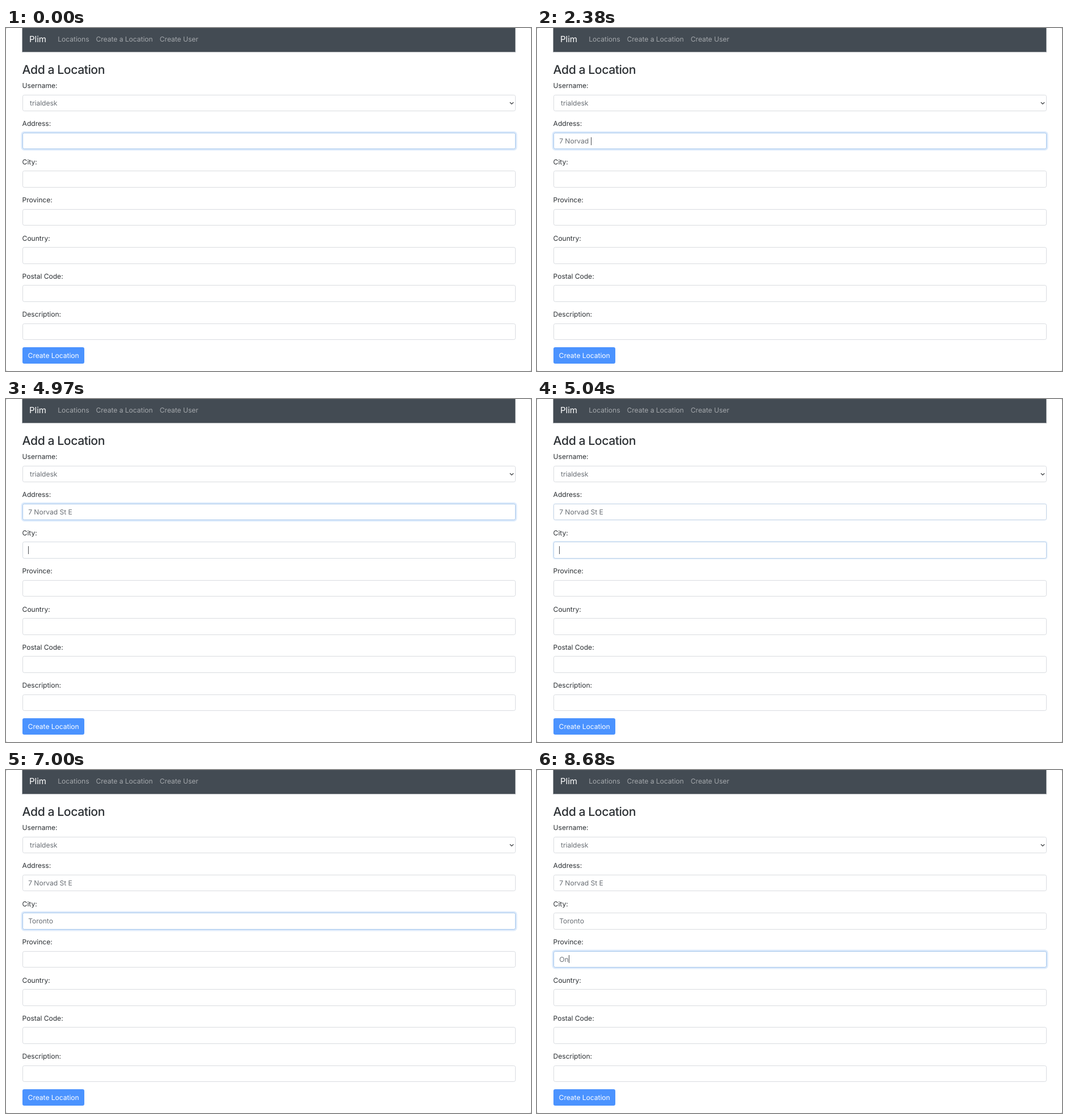
Write an HTML page that moves like this. It is 925 px wide and 606 px high and loops after 8820 ms.

```html
<!DOCTYPE html>
<html lang="en">
<head>
<meta charset="utf-8">
<title>Add a Location</title>
<style>
  html, body { margin: 0; width: 100%; height: 100%; overflow: hidden; background: #dcdcdc; }
  #page {
    position: relative; width: 925px; height: 606px; overflow: hidden;
    background: #fff; border-radius: 4px; color: #2c3034;
    font: 12.1px/20px Inter, "Open Sans", sans-serif;
    letter-spacing: -0.04px; text-rendering: geometricPrecision;
  }
  #page > * { position: absolute; white-space: pre; }
  .bar {
    left: 28px; top: -1px; width: 868px; height: 42px; background: #434b53 padding-box;
    border: 1px solid rgba(67, 75, 83, 0.45);
  }
  .nav { top: 10px; color: #a3a7ab; }
  .brand { top: 10px; left: 41px; font-size: 15.1px; color: #fff; }
  .title { left: 28.6px; top: 59px; font-size: 21.2px; line-height: 30px; font-weight: 500; letter-spacing: -0.45px; }
  .label { left: 28.6px; }
  .field {
    left: 29px; width: 868.6px; height: 29.5px; box-sizing: border-box;
    border: 1px solid #d9dce0; border-radius: 3.2px; padding-left: 9.2px;
    line-height: 28px; color: #6a6f75; background: #fff;
  }
  .caret { display: inline-block; width: 1px; height: 14px; margin-right: -1px; vertical-align: -2.6px; background: #4a4d50; }
  .button {
    left: 29px; top: 564px; width: 109px; height: 29px; line-height: 29.5px;
    border-radius: 3.2px; background: #4b93ff; color: #fff; text-indent: 9.6px;
  }
</style>
</head>
<body>
<div id="page"></div>
<script>
const LOOP = 8820, STEP = 70, FADE = 150;
const TOP = 117.6, PITCH = 67.35;
const PLAIN = [217, 220, 224], FOCUS = [163, 197, 235];
const page = document.getElementById('page');

function add(cls, text, style = {}) {
  const el = document.createElement('div');
  el.className = cls;
  el.textContent = text;
  Object.assign(el.style, style);
  page.append(el);
  return el;
}

add('bar', '');
add('brand', 'Plim');
add('nav', 'Locations', { left: '91.3px' });
add('nav', 'Create a Location', { left: '158.5px' });
add('nav', 'Create User', { left: '270.8px' });
add('title', 'Add a Location');

const names = ['Username', 'Address', 'City', 'Province', 'Country', 'Postal Code', 'Description'];
const fields = names.map((name, i) => {
  const y = TOP + PITCH * i;
  add('label', name + ':', { top: y - 25.5 + 'px' });
  const box = add('field', '', { top: y + 'px' });
  const text = document.createElement('span');
  const caret = document.createElement('span');
  caret.className = 'caret';
  box.append(text, caret);
  return { box, text, caret };
});
fields[0].text.textContent = 'trialdesk';
fields[0].box.style.paddingLeft = '12px';
add('button', 'Create Location');

const arrow = document.createElementNS('http://www.w3.org/2000/svg', 'svg');
arrow.setAttribute('width', 10);
arrow.setAttribute('height', 8);
arrow.style.cssText = 'left:885.5px;top:128.5px';
arrow.innerHTML = '<path d="M1.8 2.2L5 5.2L8.2 2.2" fill="none" stroke="#4a4d50" stroke-width="1.4"/>';
page.append(arrow);

// Each entry: field, time it gets focus, full text, time of every key press
const typing = [
  { field: 1, from: -FADE, text: '7 Norvad St E',
    keys: [840, 980, 1190, 1400, 1540, 1680, 1820, 2030, 2310, 3360, 3500, 3640, 3850] },
  { field: 2, from: 4950, text: 'Toronto',
    keys: [5880, 6160, 6440, 6790, 6790, 6860, 6860] },
  { field: 3, from: 7500, text: 'On', keys: [8400, 8680] }
];

// Times at which the caret turns on and off, in turn
const blinks = [70, 560, 840, 2870, 3290, 4340, 4830, 5530, 5880, 7000, 7560, 8120, 8400];

const clamp = v => Math.max(0, Math.min(1, v));
const ease = v => v * v * (3 - 2 * v);
const fade = (t, start) => ease(clamp((t - start) / FADE));
const mix = f => PLAIN.map((c, i) => Math.round(c + (FOCUS[i] - c) * f));

function draw(t) {
  const lit = blinks.filter(b => b <= t).length % 2 === 1;
  fields.forEach(f => { f.caret.style.visibility = 'hidden'; });
  typing.forEach((entry, i) => {
    const next = typing[i + 1];
    const end = next ? next.from : Infinity;
    const { box, text, caret } = fields[entry.field];
    const glow = fade(t, entry.from) - fade(t, end);
    text.textContent = entry.text.slice(0, entry.keys.filter(k => k <= t).length);
    box.style.borderColor = `rgb(${mix(glow)})`;
    box.style.boxShadow = `0 0 0 ${2.5 * glow}px rgba(70,145,235,${0.19 * glow})`;
    if (lit && t >= entry.from && t < end) caret.style.visibility = 'visible';
  });
}

function tick() {
  const t = performance.now() % LOOP;
  draw(Math.floor(t / STEP) * STEP);
  requestAnimationFrame(tick);
}
draw(0);
requestAnimationFrame(tick);
</script>
</body>
</html>
```
